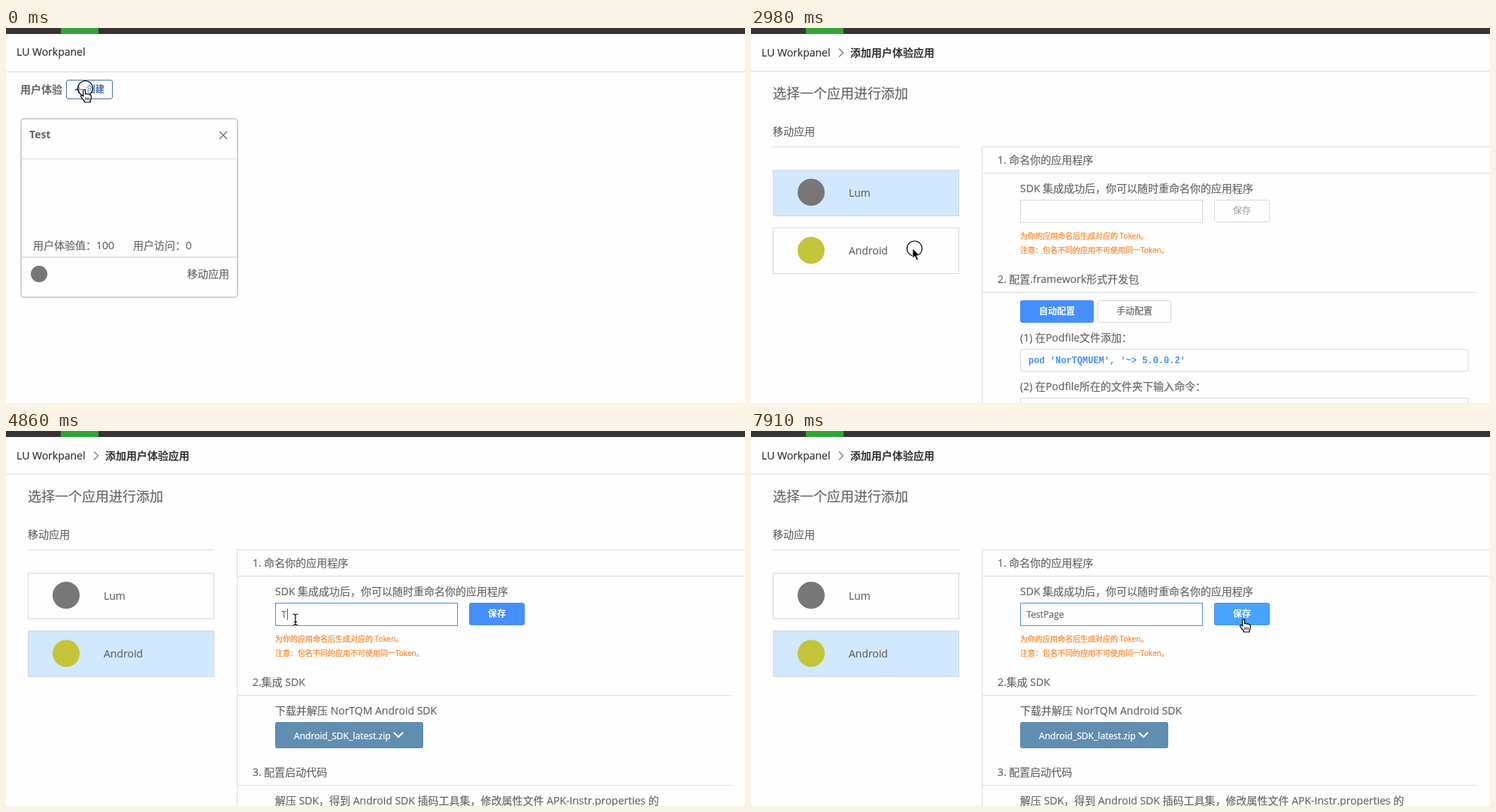
An HTML page for the animation above (8 s loop, 983x500 px).

```html
<!DOCTYPE html>
<html lang="zh-CN">
<head>
<meta charset="utf-8">
<title>用户体验</title>
<style>
html, body { margin: 0; width: 100%; height: 100%; overflow: hidden; background: #fefefe; }
svg { display: block; }
text {
  font: 14px 'Open Sans', 'Noto Sans CJK SC', 'Noto Sans CJK', sans-serif;
  color: #666; fill: currentColor; stroke: currentColor; stroke-width: .2px; white-space: pre;
}
text.bold, text.mid { font-family: 'Noto Sans', 'Noto Sans CJK SC', 'Noto Sans CJK', sans-serif; }
text.bold { font-weight: 700; stroke: none; }
text.mid { font-weight: 500; }
text.head { font-size: 18px; }
text.small { font-size: 12px; }
text.dark { color: #333; }
text.white { color: #fff; }
text.navy { color: #3f6ca8; }
text.note { font-size: 10px; color: #ff7e1a; }
text.code { font: bold 12px 'Liberation Mono', monospace; color: #448ffc; stroke: none; }
.line { fill: none; stroke: #ddd; }
.box { fill: #fefefe; stroke: #d9d9d9; }
.blue { fill: #458ffd; }
.picked .box { fill: #d1e8ff; stroke: #d3d8dc; }
.gray { fill: #777; }
.lime { fill: #c3c438; }
#field.focus { stroke: #458ff0; }
#save text { color: #aaa; }
#save.ready .box { fill: #458ffd; stroke: #458ffd; }
#save.ready text { color: #fff; font-weight: 700; stroke: none; }
#save.hover .box { fill: #46a4ff; stroke: #4696ee; }
</style>
</head>
<body>
<svg width="983" height="500" viewBox="0 0 983 500">
  <rect width="983" height="500" fill="#fefefe"/>
  <rect width="983" height="8" fill="#383434"/>
  <rect x="73" width="50" height="8" fill="#30a536"/>

  <g id="list">
    <text class="dark" x="14" y="37">LU Workpanel</text>
    <path class="line" d="M0 58.5H983"/>
    <text class="bold" x="19" y="87">用户体验</text>
    <rect x="80.5" y="69.5" width="61" height="25" rx="2.5" fill="#fefefe" stroke="#4673ab"/>
    <path d="M92 82H102M97 77V87" stroke="#3f6ca8" stroke-width="2"/>
    <text class="small bold navy" x="107" y="86">创建</text>
    <rect x="20" y="121" width="288" height="238" rx="4" fill="none" stroke="#d0d0d0" stroke-width="2"/>
    <text class="bold" x="31" y="147">Test</text>
    <path d="M284 138L294 148M294 138L284 148" stroke="#666" stroke-width="1.2"/>
    <path class="line" d="M21 174.5H307"/>
    <path class="line" d="M21 305.5H307" style="stroke:#d0d0d0"/>
    <text x="36" y="295">用户体验值：100</text>
    <text x="169" y="295">用户访问：0</text>
    <circle class="gray" cx="44" cy="328" r="11"/>
    <text x="241" y="333">移动应用</text>
  </g>

  <g id="add">
    <text class="dark" x="14" y="38">LU Workpanel</text>
    <path d="M117 27.5L122.5 33L117 38.5" fill="none" stroke="#888" stroke-width="1.5"/>
    <text class="dark bold" x="132" y="38">添加用户体验应用</text>
    <path class="line" d="M0 57.5H983M29 158.5H277M307.5 500V158.5H983M307 193.5H983M307 352.5H965"/>
    <text class="head" x="29" y="94">选择一个应用进行添加</text>
    <text x="29" y="143">移动应用</text>
    <g id="first">
      <rect class="box" x="29.5" y="189.5" width="247" height="61"/>
      <circle class="gray" cx="80" cy="219" r="18"/>
      <text x="130" y="225">Lum</text>
    </g>
    <g id="second">
      <rect class="box" x="29.5" y="266.5" width="247" height="61"/>
      <circle class="lime" cx="80" cy="296.5" r="18"/>
      <text x="130" y="302">Android</text>
    </g>

    <text x="328" y="181">1. 命名你的应用程序</text>
    <text x="358" y="219">SDK 集成成功后，你可以随时重命名你的应用程序</text>
    <rect id="field" class="box" x="358.5" y="229.5" width="242" height="30"/>
    <text id="typed" class="small" x="366.5" y="249"></text>
    <rect id="caret" y="237" width="1" height="15" fill="#555"/>
    <g id="save">
      <rect class="box" x="616.5" y="229.5" width="73" height="29" rx="2"/>
      <text class="small" x="641" y="248">保存</text>
    </g>
    <text class="note" x="358" y="281">为你的应用命名后生成对应的 Token。</text>
    <text class="note" x="358" y="300">注意：包名不同的应用不可使用同一Token。</text>

    <g id="podSteps">
      <text x="328" y="340">2. 配置.framework形式开发包</text>
      <rect class="blue" x="358" y="363" width="98" height="30" rx="3"/>
      <text class="small bold white" x="383" y="382">自动配置</text>
      <rect class="box" x="461.5" y="363.5" width="97" height="29" rx="2"/>
      <text class="small mid" x="486" y="382">手动配置</text>
      <text x="358" y="418">(1) 在Podfile文件添加：</text>
      <rect class="box" x="358.5" y="428.5" width="595.5" height="29" rx="2"/>
      <text class="code" x="369" y="447">pod 'NorTQMUEM', '~&gt; 5.0.0.2'</text>
      <text x="358" y="483">(2) 在Podfile所在的文件夹下输入命令：</text>
      <rect class="box" x="358.5" y="493.5" width="595.5" height="29" rx="2"/>
    </g>

    <g id="zipSteps">
      <text x="328" y="340">2.集成 SDK</text>
      <text x="358" y="378">下载并解压 NorTQM Android SDK</text>
      <rect x="358" y="388" width="197" height="35" rx="3" fill="#608eb1"/>
      <text class="small mid white" x="383" y="411">Android_SDK_latest.zip</text>
      <path d="M516 402L522 408L528 402" fill="none" stroke="#fff" stroke-width="2"/>
      <text x="328" y="460">3. 配置启动代码</text>
      <path class="line" d="M307 472.5H965"/>
      <text x="358" y="498">解压 SDK，得到 Android SDK 插码工具集，修改属性文件 APK-Instr.properties 的</text>
    </g>
  </g>

  <g id="pointer">
    <circle id="ring" r="10" fill="#fff" fill-opacity=".45" stroke="#000" stroke-width="1.2"/>
    <path id="arrow" d="M0 0V13L3 10.3L5.3 15.6L7.6 14.6L5.3 9.5H9.4Z" stroke="#fff" stroke-width=".8"/>
    <g id="hand" fill="#fff" stroke="#000" stroke-width="1.2">
      <path d="M-1.2 9V1.2Q-1.2 0 .2 0T1.6 1.2V6.5Q1.6 5.5 3 5.5T4.4 6.8Q4.4 6 5.8 6.2T7 7.4Q7 7 8.2 7.2T9.3 8.6V11.5Q9.3 13 8 14.5V17H.3V15.5Q-2 13-4.3 9.6Q-5 8.2-4 7.8T-1.2 9Z"/>
      <path d="M1.8 10.5V14M4 10.5V14M6.2 10.5V14" stroke-width=".9"/>
    </g>
    <g id="beam" fill="none">
      <path id="beamShape" d="M-3.5-7.5Q0-7.5 0-5.5Q0-7.5 3.5-7.5M0-5.5V5.5M-3.5 7.5Q0 7.5 0 5.5Q0 7.5 3.5 7.5M-2 3H2"/>
    </g>
  </g>
</svg>
<script>
const LOOP = 8000, STEP = 90;
const $ = id => document.getElementById(id);
const show = (id, on) => { $(id).style.display = on ? '' : 'none'; };
const within = (t, spans) => spans.some(([a, b]) => t >= a && t < b);

// The text pointer is a dark stroke over a pale halo
const beamCore = $('beamShape').cloneNode();
beamCore.removeAttribute('id');
beamCore.setAttribute('stroke', '#000');
beamCore.setAttribute('stroke-width', 1.2);
$('beamShape').setAttribute('stroke', '#fff');
$('beamShape').setAttribute('stroke-width', 2.4);
$('beam').append(beamCore);

// Pointer moves: arrival time, x, y, number of steps
const moves = [
  [450, 168, 88, 5], [830, 113, 86, 4], [920, 109, 83, 1],
  [1730, 107, 82, 1], [2980, 215, 294, 9], [3960, 385, 251.5, 8],
  [7640, 625, 263, 3], [7820, 645, 255, 1], [7910, 655, 251, 1]
];
const presses = [[0, 90], [1730, 1810], [2980, 3100]];
const caretOn = [[1730, 2260], [2800, 2980], [3100, 3310], [3780, 4320], [4770, 6030], [6300, 7640]];
const keyTimes = [4770, 5040, 5310, 5490, 6300, 6570, 6930, 7110];
const name = 'TestPage';

function pointerAt(t) {
  let x = 104, y = 82;
  for (const [end, toX, toY, n] of moves) {
    const done = Math.floor((t - end) / STEP) + n;
    const p = Math.max(0, Math.min(1, done / n));
    const e = p * p * (3 - 2 * p);
    x += (toX - x) * e;
    y += (toY - y) * e;
    if (p < 1) break;
  }
  return [x, y];
}

function draw(t) {
  const adding = t >= 1730, zip = t >= 3100;
  show('list', !adding);
  show('add', adding);
  show('podSteps', !zip);
  show('zipSteps', zip);
  $('first').classList.toggle('picked', !zip);
  $('second').classList.toggle('picked', zip);

  $('field').classList.toggle('focus', t < 2980 || zip);
  $('typed').textContent = name.slice(0, keyTimes.filter(k => t >= k).length);
  show('caret', within(t, caretOn));
  if (adding) $('caret').setAttribute('x', Math.round(367 + $('typed').getComputedTextLength()));
  $('save').classList.toggle('ready', t >= 4860);
  $('save').classList.toggle('hover', t >= 7820);

  const [x, y] = pointerAt(t);
  const beam = adding && x > 358 && x < 601 && y > 229 && y < 260;
  const hand = adding ? x > 616 && y < 259 : x < 142;
  $('pointer').setAttribute('transform', `translate(${x} ${y})`);
  show('beam', beam);
  show('hand', hand);
  show('arrow', !beam && !hand);
  show('ring', within(t, presses));
  $('ring').setAttribute('cx', hand ? 1.5 : 2.5);
  $('ring').setAttribute('cy', hand ? -1.5 : 0);
}

function tick() {
  draw(performance.now() % LOOP);
  requestAnimationFrame(tick);
}
tick();
</script>
</body>
</html>
```
